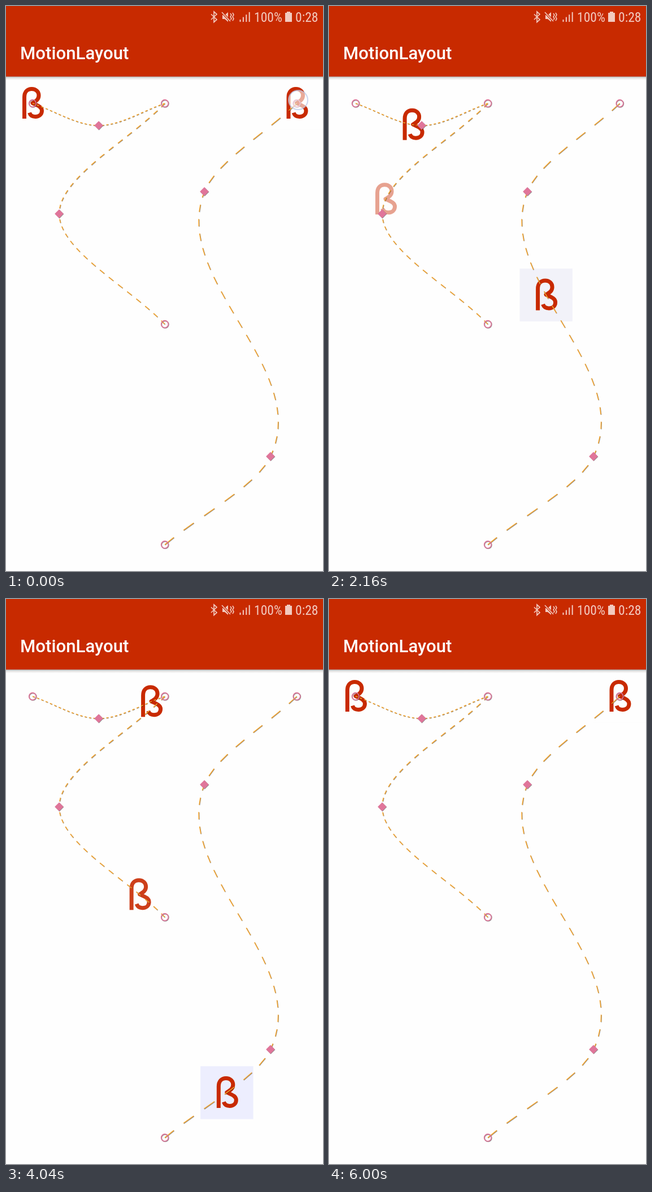
Write an HTML page with a canvas that moves like this. It is 561 by 998 pixels and loops after 6.64 s.

```html
<!DOCTYPE html>
<html lang="en">
<head>
<meta charset="utf-8">
<title>MotionLayout</title>
<style>
  html, body { margin: 0; width: 100%; height: 100%; overflow: hidden; background: #fefefe; }
  canvas { display: block; }
</style>
</head>
<body>
<canvas id="stage" width="561" height="998"></canvas>
<script>
const ctx = document.getElementById('stage').getContext('2d');
const LOOP = 6640, STEP = 40, DURATION = 1000, FADE = 200, DASH_POINTS = 62;
const RED = '#c82a00', PAPER = '#fefefe', PALE = '#f2cabf';

// Each tap shows a spot, then starts a transition to the other state.
const taps = [
  { shown: 0, start: 66, x: 517, y: 166 },
  { shown: 1560, start: 1618, x: 276.5, y: 169.5 },
  { shown: 3160, start: 3247, x: 515, y: 175 },
  { shown: 4960, start: 4999, x: 289, y: 564.5 }
];

// Cubic Hermite curve: secant slopes at the ends, averaged slopes inside.
function spline(ts, vs) {
  const last = ts.length - 1;
  const secant = i => (vs[i + 1] - vs[i]) / (ts[i + 1] - ts[i]);
  const slopes = ts.map((_, i) =>
    i === 0 ? secant(0) : i === last ? secant(last - 1) : (secant(i - 1) + secant(i)) / 2);
  return t => {
    let i = 0;
    while (i < last - 1 && t > ts[i + 1]) i++;
    const h = ts[i + 1] - ts[i], u = (t - ts[i]) / h, v = 1 - u;
    return v * v * (1 + 2 * u) * vs[i] + u * u * (3 - 2 * u) * vs[i + 1]
      + h * u * v * (v * slopes[i] - u * slopes[i + 1]);
  };
}

function makeRoute(ts, xs, ys) {
  const x = spline(ts, xs), y = spline(ts, ys);
  return { at: p => [x(p), y(p)], keys: ts.map((_, i) => [xs[i], ys[i]]) };
}

const top3 = makeRoute([0, .5, 1], [47, 164, 281], [172, 211, 172]);
const fading = makeRoute([0, .5, 1], [281, 94, 281], [172, 367, 562]);
const boxed = makeRoute([0, .2, .8, 1], [514.5, 351, 468, 281], [172, 327.8, 795.6, 951.5]);
const routes = [top3, fading, boxed];

const letter = new Path2D(
  'M-14.5 27V-11C-14.5-20.5-9-25.5-1.5-25.5C6-25.5 11-20.5 11-14' +
  'C11-7 6-4 0-.5C7 3 16.5 5.5 16.5 13C16.5 19.5 11.5 23.5 5 23.5C-.5 23.5-4 21-5.5 16.5');

const bluetooth = new Path2D('M363 14.5L373 24L368 28.5V10L373 14.5L363 24');
const speaker = new Path2D('M383 16H387L393 11V28L387 23H383Z');
const waves = new Path2D('M397 13L399 16L397 19L399 22L397 25M401 12L403 15.5L401 19L403 22.5L401 26');

function stroke(path, color, width) {
  ctx.strokeStyle = color;
  ctx.lineWidth = width;
  ctx.stroke(path);
}

function progress(time) {
  let p = 0;
  taps.forEach(({ start }, i) => {
    if (time < start) return;
    const u = Math.min(1, (time - start) / DURATION);
    const eased = (1 - Math.cos(Math.PI * u)) / 2;
    p = i % 2 ? 1 - eased : eased;
  });
  return p;
}

const boxStops = [0, .4345, .896, 1];
const boxColors = [[254, 254, 254], [242, 242, 249], [237, 238, 254], [217, 220, 254]];
function boxColor(p) {
  let i = 0;
  while (i < 2 && p > boxStops[i + 1]) i++;
  const u = (p - boxStops[i]) / (boxStops[i + 1] - boxStops[i]);
  return `rgb(${boxColors[i].map((c, k) => Math.round(c + (boxColors[i + 1][k] - c) * u))})`;
}

function drawLetter([x, y], alpha) {
  ctx.save();
  ctx.translate(x, y);
  ctx.globalAlpha = alpha;
  ctx.lineJoin = 'round';
  stroke(letter, RED, 7);
  ctx.restore();
}

// Dashes join every other pair of points spaced evenly in progress.
const dashes = new Path2D(), rings = new Path2D(), diamonds = new Path2D();
for (const { at, keys } of routes) {
  for (let i = 0; i < DASH_POINTS; i++) {
    dashes[i % 2 ? 'lineTo' : 'moveTo'](...at(i / (DASH_POINTS - 1)));
  }
  keys.forEach(([x, y], i) => {
    if (i === 0 || i === keys.length - 1) {
      rings.moveTo(x + 6.3, y);
      rings.arc(x, y, 6.3, 0, 7);
    } else {
      diamonds.moveTo(x, y - 7.8);
      diamonds.lineTo(x + 7.8, y);
      diamonds.lineTo(x, y + 7.8);
      diamonds.lineTo(x - 7.8, y);
      diamonds.closePath();
    }
  });
}

function drawGuides(lineColor, keyColor) {
  stroke(dashes, lineColor, 1.6);
  stroke(rings, keyColor, 1.7);
  ctx.fillStyle = keyColor;
  ctx.fill(diamonds);
}

function drawTouch(time) {
  for (const { shown, start, x, y } of taps) {
    if (time < shown || time > start + FADE) continue;
    ctx.globalAlpha = 1 - Math.max(0, time - start) / FADE;
    ctx.beginPath();
    ctx.arc(x, y, 17, 0, 7);
    ctx.fillStyle = 'rgba(255,255,255,.6)';
    ctx.fill();
    ctx.strokeStyle = 'rgba(178,192,230,.65)';
    ctx.lineWidth = 2;
    ctx.stroke();
    ctx.globalAlpha = 1;
  }
}

const statusFont = size => `condensed ${size}px "Roboto Condensed", Roboto, sans-serif`;
ctx.font = statusFont(24);
const statusSize = Math.min(24, 24 * 50 / ctx.measureText('100%').width);

function drawHeader() {
  const shade = ctx.createLinearGradient(0, 124, 0, 131);
  shade.addColorStop(0, 'rgba(0,0,0,.36)');
  shade.addColorStop(.4, 'rgba(0,0,0,.12)');
  shade.addColorStop(1, 'rgba(0,0,0,0)');
  ctx.fillStyle = shade;
  ctx.fillRect(0, 124, 561, 7);
  ctx.fillStyle = RED;
  ctx.fillRect(0, 0, 561, 124.6);

  ctx.fillStyle = '#fff';
  ctx.font = '500 31.2px Roboto, sans-serif';
  ctx.fillText('MotionLayout', 25, 93.5);

  ctx.fillStyle = PALE;
  ctx.font = statusFont(statusSize);
  ctx.fillText('100%', 439, 28);
  ctx.fillText('0:28', 512, 28);

  stroke(bluetooth, PALE, 1.7);
  ctx.fill(speaker);
  stroke(waves, PALE, 1.6);
  ctx.beginPath();
  ctx.moveTo(382, 11);
  ctx.lineTo(397, 27);
  ctx.strokeStyle = RED;
  ctx.lineWidth = 4;
  ctx.stroke();
  ctx.strokeStyle = PALE;
  ctx.lineWidth = 1.7;
  ctx.stroke();
  for (let i = 0; i < 4; i++) {
    const height = 4 + i * 4.4;
    ctx.fillRect(413.5 + i * 5.4, 28 - height, 2, height);
  }
  ctx.fillRect(497, 10, 6, 3);
  ctx.fillRect(494, 12, 12, 16);
}

function draw(now) {
  const time = Math.floor(now % LOOP / STEP) * STEP;
  const p = progress(time);
  ctx.fillStyle = PAPER;
  ctx.fillRect(0, 0, 561, 998);

  const [x, y] = boxed.at(p);
  ctx.fillStyle = boxColor(p);
  ctx.fillRect(x - 46.7, y - 46.7, 93.4, 93.4);
  drawLetter(top3.at(p), 1);
  drawLetter(fading.at(p), p);
  drawLetter([x, y], 1);

  ctx.save();
  ctx.translate(.6, .6);
  drawGuides('rgba(0,0,0,.45)', 'rgba(0,0,0,.45)');
  ctx.restore();
  drawGuides('#f5a52f', '#e0759a');

  drawHeader();
  drawTouch(time);
  requestAnimationFrame(draw);
}
requestAnimationFrame(draw);
</script>
</body>
</html>
```
